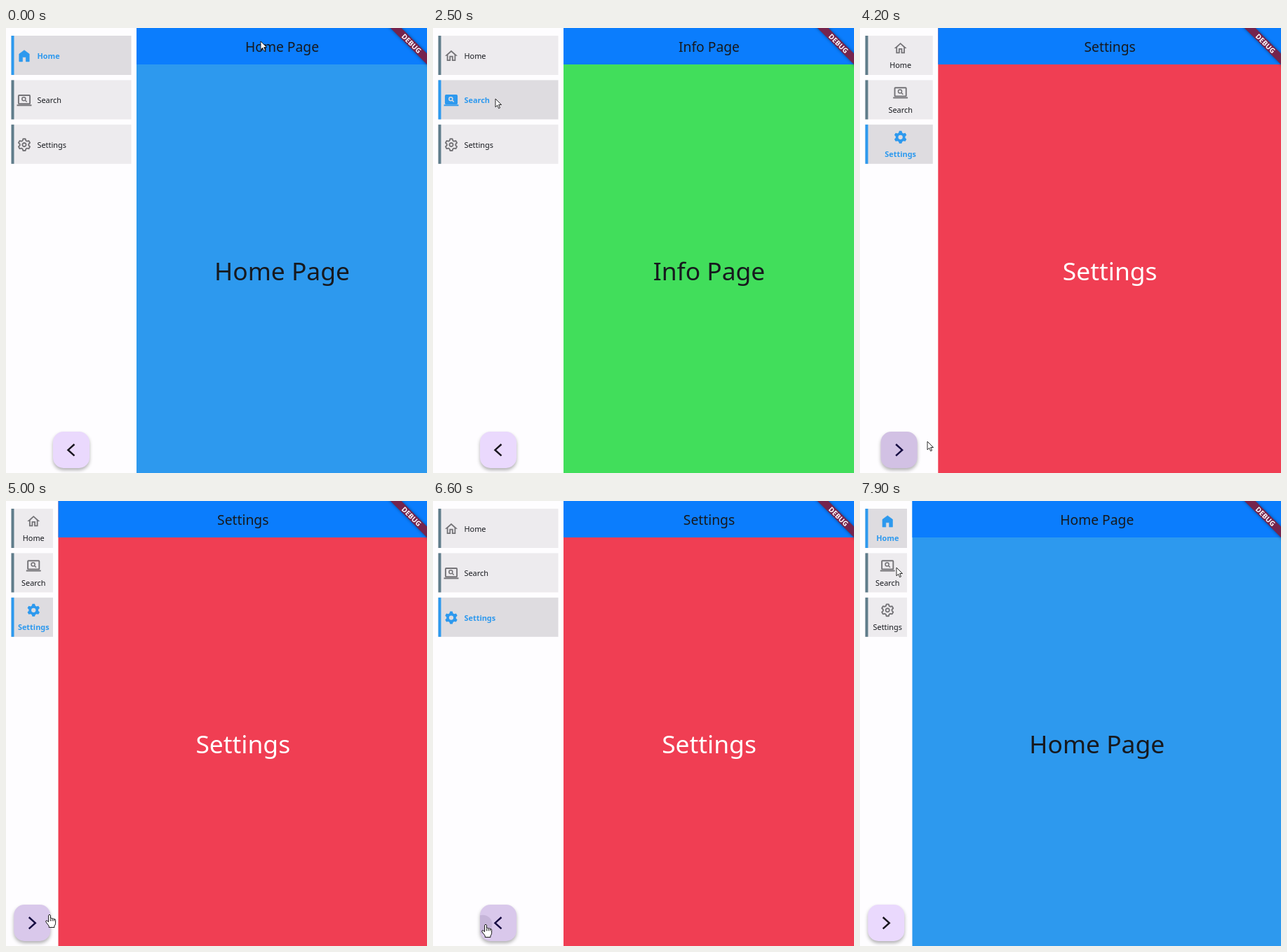
An HTML page with a canvas for the animation above (8 s loop, 600 px wide and 635 px high).

```html
<!DOCTYPE html>
<html>
<head>
<meta charset="utf-8">
<style>
  html, body { margin: 0; width: 100%; height: 100%; overflow: hidden; background: #fefdff; }
  canvas { display: block; }
</style>
</head>
<body>
<canvas id="stage" width="600" height="635"></canvas>
<script>
const c = document.getElementById('stage').getContext('2d');
const LOOP = 8000, WIDE = 186, NARROW = 74.5, SLIDE = 300;
const FONT = '"Noto Sans", "Open Sans", sans-serif';
const BLUE = '#2d99ee', GREY = '#747377', INK = '#17191e';

const pages = [
  { title: 'Home Page', label: 'Home', color: BLUE, ink: INK },
  { title: 'Info Page', label: 'Search', color: '#41de5b', ink: INK },
  { title: 'Settings', label: 'Settings', color: '#f03e53', ink: '#fff' }
];
const pageClicks = [[0, 0], [2150, 1], [3050, 2], [7450, 0]];
const toggles = [[4000, false], [5482, true], [6700, false]];
// time, x, y of the pointer tip
const pointer = [
  [0, 363, 19], [300, 363, 19], [1050, 84, 40], [1300, 82, 40], [1700, 82, 41],
  [2050, 89, 101], [2650, 89, 101], [2950, 86, 167], [3250, 86, 167],
  [3850, 97, 590], [4250, 96, 590], [5000, 62, 590], [5400, 47, 587],
  [5750, 47, 587], [6400, 75, 604], [6800, 75, 604],
  [7350, 42, 42], [7550, 42, 42], [7900, 52, 95], [8000, 52, 95]
];

const clamp = v => Math.max(0, Math.min(1, v));
const lastBefore = (list, t) => list.filter(e => e[0] <= t).pop();

function pointerAt(t) {
  const i = pointer.findIndex(p => p[0] > t);
  const [a, b] = [pointer[i - 1], pointer[i]];
  let k = (t - a[0]) / (b[0] - a[0]);
  k = k * k * (3 - 2 * k);
  return [a[1] + (b[1] - a[1]) * k, a[2] + (b[2] - a[2]) * k];
}

function rect(x, y, w, h, color) {
  c.fillStyle = color;
  c.fillRect(x, y, w, h);
}

function text(s, x, y, size, color, align = 'center', weight = 400) {
  c.font = `${weight} ${size}px ${FONT}`;
  c.textAlign = align;
  c.fillStyle = color;
  c.fillText(s, x, y);
}

function place(x, y, scale, draw) {
  c.save();
  c.translate(x, y);
  c.scale(scale, scale);
  draw();
  c.restore();
}

function disc(x, y, r) {
  c.beginPath();
  c.arc(x, y, r, 0, 7);
}

// Icons use a 24 unit grid centred on the origin
const icons = [
  on => {
    const shape = new Path2D(on
      ? 'M-8 9V-3L0-9L8-3V9H2.7V2H-2.7V9Z'
      : 'M0-6.3L5-1.8V6H3V0H-3V6H-5V-1.8ZM0-9L-10 0H-7V8H-1V2H1V8H7V0H10Z');
    c.fill(shape, 'evenodd');
    if (on) {
      c.lineWidth = .7;
      c.lineJoin = 'round';
      c.stroke(shape);
    }
  },
  on => {
    c.lineWidth = 2.1;
    c.beginPath();
    c.roundRect(-9, -8, 18, 13.5, 1);
    c.stroke();
    if (on) c.fill();
    c.fillRect(-11.6, 6.8, 23.2, 2.2);
    if (on) c.strokeStyle = '#dedce0';
    c.lineWidth = 1.7;
    disc(-.7, -2.2, 2.8);
    c.moveTo(1.3, -.2);
    c.lineTo(4.1, 2.6);
    c.stroke();
  },
  on => {
    const size = on ? 1 : .93;
    c.beginPath();
    for (let tooth = 0; tooth < 6; tooth++)
      for (const [r, a] of [[10.2, -11], [10.2, 11], [7.6, 22], [7.6, 38]]) {
        const angle = (tooth * 60 + a - 90) * Math.PI / 180;
        c.lineTo(r * size * Math.cos(angle), r * size * Math.sin(angle));
      }
    c.closePath();
    c.lineWidth = 2.1;
    c.lineJoin = 'round';
    if (on) {
      c.moveTo(3.5, 0);
      c.arc(0, 0, 3.5, 0, 7);
      c.fill('evenodd');
    } else {
      c.stroke();
      disc(0, 0, 2.9);
      c.stroke();
    }
  }
];

function navItem(i, on, width, wide) {
  const y = 11 + i * 63.4, right = width - 7.5, mid = (11.5 + right) / 2;
  const color = on ? BLUE : GREY, weight = on ? 700 : 400;
  const ink = on ? BLUE : INK;
  rect(7.5, y, right - 7.5, 56, on ? '#dedce0' : '#edebee');
  rect(7.5, y, 4, 56, on ? BLUE : '#607d8b');
  place(wide ? 26 : mid, y + (wide ? 28.8 : 18), .9, () => {
    c.fillStyle = c.strokeStyle = color;
    icons[i](on);
  });
  let label = pages[i].label;
  if (wide) {
    c.font = `${weight} 10.9px ${FONT}`;
    while (label && c.measureText(label).width > width - 76) label = label.slice(0, -1);
    text(label, 44.5, y + 33, 10.9, ink, 'left', weight);
  } else {
    text(label, mid, y + 46.2, 10.9, ink, 'center', weight);
  }
}

function button(t, x, wide, hover) {
  const press = toggles.find(([at]) => t >= at - 130 && t < at + 350);
  c.save();
  c.shadowColor = 'rgba(0,0,0,.3)';
  c.shadowBlur = 5;
  c.shadowOffsetY = 3;
  c.fillStyle = hover || press ? '#d9c8eb' : '#ead9fd';
  c.beginPath();
  c.roundRect(x - 26, 576, 52, 52, 15);
  c.fill();
  c.shadowColor = 'transparent';
  c.clip();
  if (press) {
    const age = t - press[0] + 130, [px, py] = pointerAt(press[0]);
    c.fillStyle = `rgba(60,40,80,${.12 * (1 - clamp((age - 270) / 100))})`;
    disc(px - 4, py, 5 + age * .27);
    c.fill();
  }
  c.restore();
  const tip = wide ? -4.5 : 4.5;
  c.strokeStyle = hover || press ? '#160b42' : '#19161f';
  c.lineWidth = 2.5;
  c.lineJoin = 'miter';
  c.beginPath();
  c.moveTo(x - tip, 594);
  c.lineTo(x + tip, 602.2);
  c.lineTo(x - tip, 610.4);
  c.stroke();
}

function banner() {
  c.save();
  c.translate(600, 0);
  c.rotate(Math.PI / 4);
  c.shadowColor = 'rgba(0,0,0,.45)';
  c.shadowBlur = 4;
  rect(-50, 25.8, 100, 11, '#75244d');
  c.shadowColor = 'transparent';
  text('DEBUG', 0, 34.9, 10, '#fff', 'center', 900);
  c.restore();
}

const arrow = new Path2D('M0 0V16L3.7 12.5L6.2 18.5L8.8 17.4L6.3 11.5H11.5Z');
const hand = new Path2D('M-1.7 1.5Q0-1.2 1.7 1.5V7Q3.4 5.8 5 7.4Q6.6 6.5 8 8.2' +
  'Q10.5 7.5 10.5 10V15Q10.5 18 8.5 20V22.5H-1V20L-6.3 13Q-7 10.5-4.5 10.7L-1.7 13Z');

function drawPointer(x, y, over) {
  place(x, y, over ? .82 : .74, () => {
    const shape = over ? hand : arrow;
    c.fillStyle = '#fff';
    c.strokeStyle = '#111';
    c.lineWidth = 1.2;
    c.lineJoin = 'round';
    c.fill(shape);
    c.stroke(shape);
    if (over) {
      c.beginPath();
      for (const fx of [1.7, 4.8, 7.8]) {
        c.moveTo(fx, 8);
        c.lineTo(fx, 11.5);
      }
      c.stroke();
    }
  });
}

function draw(t) {
  const current = lastBefore(pageClicks, t)[1], page = pages[current];
  const toggle = lastBefore(toggles, t);
  const wide = toggle ? toggle[1] : true;
  const slide = toggle ? clamp((t - toggle[0]) / SLIDE) : 1;
  const width = NARROW + (WIDE - NARROW) * (wide ? slide : 1 - slide);
  const mid = (width + 600) / 2 + .5;

  rect(0, 0, 600, 635, '#fefdff');
  rect(width, 0, 600 - width, 635, page.color);
  rect(width, 0, 600 - width, 52, '#0b7dfd');
  text(page.title, mid, 34.4, 19.3, INK, 'center', 350);
  text(page.title, mid, 360, 35.4, page.ink, 'center', 350);
  banner();
  pages.forEach((p, i) => navItem(i, i === current, width, wide));

  const [x, y] = pointerAt(t);
  const over = Math.abs(x - width / 2) < 26.5 && y > 575 && y < 629;
  button(t, width / 2, wide, over);
  drawPointer(x, y, over);
}

const start = performance.now();
function frame() {
  draw((performance.now() - start) % LOOP);
  requestAnimationFrame(frame);
}
frame();
</script>
</body>
</html>
```
